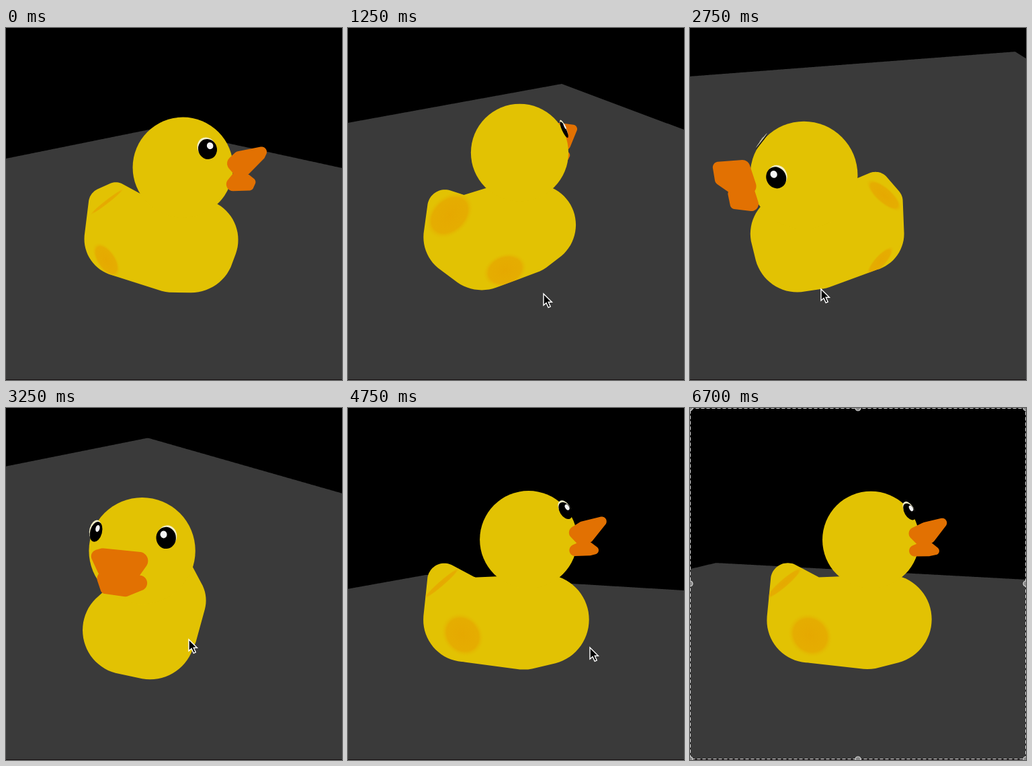
Animation, 500 px wide and 523 px high, one loop 6900 ms. Source, as an HTML page:

```html
<!DOCTYPE html>
<html lang="en">
<head>
<meta charset="utf-8">
<title>Turning duck</title>
<style>
  html, body { margin: 0; width: 100%; height: 100%; overflow: hidden; background: #000; }
  svg { display: block; width: 100%; height: 100%; }
</style>
</head>
<body>
<svg viewBox="0 0 500 523">
  <defs>
    <radialGradient id="soft">
      <stop offset="0" stop-color="#e6a400" stop-opacity=".85"/>
      <stop offset=".75" stop-color="#e6a600" stop-opacity=".75"/>
      <stop offset="1" stop-color="#e3bd00" stop-opacity="0"/>
    </radialGradient>
    <clipPath id="inBody"><path id="bodyClip"/></clipPath>
  </defs>
  <rect width="500" height="523"/>
  <path id="floor" fill="#3a3a3a"/>
  <rect y="522" width="500" height="1" fill="#171113"/>
  <path id="beakBack" fill="#e27102"/>
  <path id="body" fill="#e2c203"/>
  <g id="patches" clip-path="url(#inBody)"></g>
  <circle id="head" fill="#e2c203"/>
  <g id="eyes"></g>
  <path id="beakFront" fill="#e27102"/>
  <path id="cursor" d="M0 0V17L4 13.4L7.2 20.4L10.2 19L7.2 12.3H12.4Z" stroke="#fff" stroke-width="1.4"/>
  <g id="frame">
    <rect x=".5" y=".5" width="499" height="521" fill="none" stroke="#222"/>
    <rect x=".5" y=".5" width="499" height="521" fill="none" stroke="#ddd" stroke-dasharray="5 3"/>
  </g>
</svg>
<script>
const LOOP = 6900, STEP = 125, CAMERA = 520, DEG = Math.PI / 180;
const { sin, cos, atan2, hypot, max, min, floor } = Math;
const $ = id => document.getElementById(id);

function set(el, attrs) {
  for (const k in attrs) el.setAttribute(k, attrs[k]);
  return el;
}
function add(name, parent, attrs = {}) {
  const el = document.createElementNS('http://www.w3.org/2000/svg', name);
  parent.appendChild(el);
  return set(el, attrs);
}

// Camera: time, yaw, pitch, centre x, centre y, zoom
const views = [
  [0, 20, 23, 234, 312, .93],
  [1250, -42, 25, 233, 298, .95],
  [1880, -79, 28, 222, 290, .93],
  [2750, -199, 43, 201, 304, .93],
  [3750, -306, 15, 224, 309, .93],
  [4750, -364, 5.5, 238.5, 310, .99],
  [6700, -369, 5.5, 239.5, 310, .99]
];

// Floor edges as lines: time, height at mid stage, slope
const edges = [
  [[0, 143.5, -.202], [1250, -200, -.6]],
  [[0, 153.8, .217], [1250, 95.4, -.182], [1880, -200, -.6]],
  [[0, -100, .9], [1250, 57.6, .374], [1880, 106, .088], [2250, 37, .02],
   [2750, 52.9, -.076], [3000, 0, -.1], [3750, 110, -.4]],
  [[1880, -150, .9], [2750, -111, .625], [3750, 222, -.055], [4750, 224, -.179], [6700, 180, -.237]],
  [[2750, -250, 1], [3750, 164.5, .294], [4750, 256, .06], [6700, 241.5, .054]]
];

const pointer = [
  [250, 342, 421], [1250, 291, 395], [1880, 273, 386],
  [2750, 195, 388], [3750, 349, 300], [4750, 360, 356]
];

// The duck is built from balls: forward, side, up, radius
const pair = (f, s, u, r) => [[f, s, u, r], [f, -s, u, r]];
const HEAD = [30, 0, 114, 72];
const onHead = (f, s, u, r) => pair(HEAD[0] + f, s, HEAD[2] + u, r);
const rear = pair(-63, 22, -2, 60);
const trunk = [...rear, ...pair(22, 16, -8, 68), ...pair(51, 18, -3, 66)];
const tail = [...rear, ...pair(-92, 20, 54, 24)];
const upperBill = [...onHead(76, 22, 14, 10), ...onHead(84, 16, 4, 10), ...onHead(105, 14, 25, 7)];
const lowerBill = [...onHead(76, 22, -13, 9), ...onHead(82, 14, -8, 7), ...onHead(96, 12, -16, 6)];

// Flat discs lying on the surface: place, normal, radius
const patches = [
  { at: [-98, 0, 50], n: [-.65, 0, .76], r: 36 },
  ...[1, -1].map(s => ({ at: [-64, 72 * s, -16], n: [-.45, .85 * s, -.25], r: 30 }))
];
const eyes = [1, -1].map(side => {
  const n = [.624, .624 * side, .469];
  return { side, n, at: n.map((v, i) => HEAD[i] + 71 * v), r: 12.5 };
});
for (const p of patches) p.el = add('ellipse', $('patches'), { fill: 'url(#soft)' });
for (const e of eyes) {
  e.rim = add('ellipse', $('eyes'), { fill: '#f3efc8' });
  e.el = add('ellipse', $('eyes'));
  e.glint = add('ellipse', $('eyes'), { fill: '#f4f4f4' });
}
for (const x of [0, 250, 500]) for (const y of [0, 261, 522])
  if (x !== 250 || y !== 261)
    add('circle', $('frame'), { cx: x, cy: y, r: 4, fill: '#888', stroke: '#ddd', 'stroke-width': 1.2 });

// Value of a keyed track at time t, held beyond its ends
function at(keys, t) {
  const i = keys.findIndex(k => k[0] > t);
  if (i === 0) return keys[0].slice(1);
  if (i < 0) return keys[keys.length - 1].slice(1);
  const a = keys[i - 1], b = keys[i], u = (t - a[0]) / (b[0] - a[0]);
  return a.slice(1).map((v, n) => v + (b[n + 1] - v) * u);
}

function camera(t) {
  const [yaw, pitch, cx, cy, zoom] = at(views, t);
  const sy = sin(yaw * DEG), cyaw = cos(yaw * DEG), sp = sin(pitch * DEG), cp = cos(pitch * DEG);
  const turn = ([f, s, u]) => {
    const near = f * sy + s * cyaw;
    return [f * cyaw - s * sy, near * sp - u * cp, near * cp + u * sp];
  };
  const project = ball => {
    const [x, y, z] = turn(ball), m = zoom / (1 - z / CAMERA);
    return { x: cx + x * m, y: cy + y * m, m, r: (ball[3] || 0) * m };
  };
  return { turn, project, facing: sy };
}

// Outline of the hull around projected balls
function hull(balls) {
  const pts = [];
  for (let a = 0; a < 360; a += 5) {
    const c = cos(a * DEG), s = sin(a * DEG);
    const reach = b => b.x * c + b.y * s + b.r;
    const b = balls.reduce((p, q) => reach(q) > reach(p) ? q : p);
    pts.push(`${(b.x + b.r * c).toFixed(1)} ${(b.y + b.r * s).toFixed(1)}`);
  }
  return 'M' + pts.join('L') + 'Z';
}

// Foreshortened disc, thin along its tilted normal
function disc(el, cam, d, dx = 0, dy = 0, k = 1) {
  const [nx, ny, nz] = cam.turn(d.n), p = cam.project(d.at), thin = max(0, nz);
  set(el, {
    rx: d.r * k * p.m * thin, ry: d.r * k * p.m,
    visibility: thin ? 'visible' : 'hidden',
    transform: `translate(${p.x + dx * thin} ${p.y + dy}) rotate(${atan2(ny, nx) / DEG})`
  });
}

function drawFloor(t) {
  const lines = edges.map(e => at(e, t));
  let d = 'M0 522';
  for (let x = 0; x <= 500; x += 2)
    d += `L${x} ${max(...lines.map(([y, slope]) => y + slope * (x - 250)))}`;
  set($('floor'), { d: d + 'L500 522Z' });
}

function drawDuck(t) {
  const cam = camera(t), shape = balls => hull(balls.map(cam.project));
  const body = shape(trunk) + shape(tail);
  set($('body'), { d: body });
  set($('bodyClip'), { d: body });

  const head = cam.project(HEAD);
  set($('head'), { cx: head.x, cy: head.y, r: head.r });

  const beak = shape(upperBill) + shape(lowerBill), away = cam.facing < -.25;
  set($('beakBack'), { d: away ? beak : '' });
  set($('beakFront'), { d: away ? '' : beak });

  for (const p of patches) disc(p.el, cam, p);
  for (const e of eyes) {
    disc(e.rim, cam, e, -2 * e.side, -3, .97);
    disc(e.el, cam, e);
    disc(e.glint, cam, e, 4 * e.side, -5, .34);
  }
}

function draw(t) {
  drawFloor(t);
  drawDuck(t);
  const done = t >= 5750;
  set($('cursor'), {
    transform: `translate(${at(pointer, t)})`,
    visibility: t >= 250 && !done ? 'visible' : 'hidden'
  });
  set($('frame'), { visibility: done ? 'visible' : 'hidden' });
}

// The picture advances eight times a second, with a longer hold at the end
function stepped(ms) {
  return ms >= 6700 ? 6700 : min(6500, floor(ms / STEP) * STEP);
}

function tick(now) {
  draw(stepped(now % LOOP));
  requestAnimationFrame(tick);
}
draw(0);
requestAnimationFrame(tick);
</script>
</body>
</html>
```
